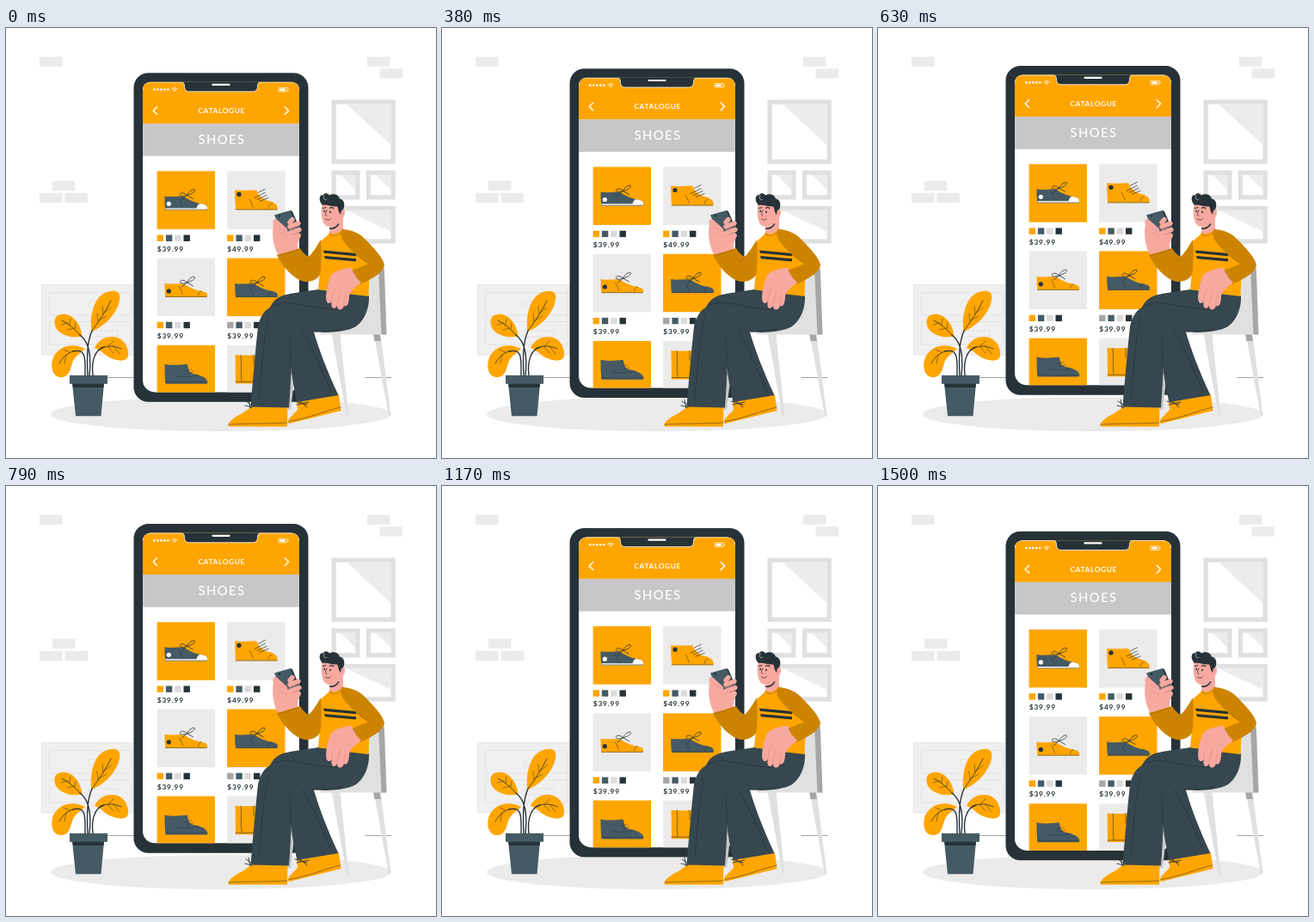
An HTML page with a canvas that plays this animation: 500 px wide and 500 px high, repeating every 1.54 s.

```html
<!DOCTYPE html>
<html lang="en">
<head>
<meta charset="utf-8">
<title>Shoe catalogue</title>
<style>
html, body { margin: 0; width: 100%; height: 100%; overflow: hidden; background: #fff; }
canvas { display: block; width: 500px; height: 500px; }
</style>
</head>
<body>
<canvas id="stage"></canvas>
<script>
const canvas = document.getElementById('stage');
const ctx = canvas.getContext('2d');
const ratio = window.devicePixelRatio || 1;
canvas.width = canvas.height = 500 * ratio;

const ORANGE = '#ffa500', AMBER = '#cc8400', INK = '#263238', SLATE = '#455a64', TROUSERS = '#37474f';
const SKIN = '#f7a9a0', BLUSH = '#e58f86', PALE = '#ebebeb', GREY = '#e0e0e0', BAND = '#c7c7c7', WHITE = '#fff';

const paths = new Map();
function path(d) {
  if (!paths.has(d)) paths.set(d, new Path2D(d));
  return paths.get(d);
}
function fill(d, color) {
  ctx.fillStyle = color;
  ctx.fill(path(d));
}
function line(d, color = INK, width = 0.7) {
  ctx.strokeStyle = color;
  ctx.lineWidth = width;
  ctx.stroke(path(d));
}
function rect(x, y, w, h, color) {
  ctx.fillStyle = color;
  ctx.fillRect(x, y, w, h);
}
function round(x, y, w, h, r, color) {
  ctx.fillStyle = color;
  ctx.beginPath();
  ctx.roundRect(x, y, w, h, r);
  ctx.fill();
}
function oval(x, y, rx, ry, color) {
  ctx.fillStyle = color;
  ctx.beginPath();
  ctx.ellipse(x, y, rx, ry, 0, 0, Math.PI * 2);
  ctx.fill();
}
function text(str, x, y, font, color, align = 'left', spacing = 0) {
  ctx.font = font + ' Lato, sans-serif';
  ctx.letterSpacing = spacing + 'px';
  ctx.textAlign = align;
  ctx.fillStyle = color;
  ctx.fillText(str, x, y);
}

function pictureFrame(x, y, w, h) {
  rect(x, y, w, h, GREY);
  rect(x + 5.3, y + 5.3, w - 10.6, h - 10.6, WHITE);
  const right = x + w - 5.3, top = y + 5.3;
  ctx.fillStyle = '#ececec';
  ctx.beginPath();
  ctx.moveTo(x + 5.3 + w * 0.17, top);
  ctx.lineTo(right, top);
  ctx.lineTo(right, top + (h - 10.6) * 0.74);
  ctx.fill();
}

function room() {
  const bricks = [[39, 33.5], [420, 33.5], [434.5, 47.3], [53.8, 177.7], [39, 191.8], [68.5, 191.8]];
  for (const [x, y] of bricks) rect(x, y, 26.5, 11.3, PALE);
  pictureFrame(378.5, 83.5, 74.3, 74.5);
  pictureFrame(378.5, 165.5, 33, 34);
  pictureFrame(419, 165.5, 33.8, 34);
  pictureFrame(378.5, 207, 74.3, 43.6);

  rect(41.5, 298.5, 112, 81.5, '#f0f0f0');
  line('M41.5 298.7H153M41.7 298.5V380H153', GREY, 0.8);
  line('M51 307.5H146V334H51ZM51 341.5H146V368H51Z', GREY, 0.8);
  line('M96.5 318H130V325H96.5ZM96.5 352H130V359H96.5Z', GREY, 0.8);

  oval(250, 449, 198, 20, PALE);
  line('M106 406.5H149M418 406.5H448', INK, 0.45);
}

function plant() {
  fill('M99.5 353C97 335 102 314 115 308C124 304 132 305 132.3 312C133 326 118 346 99.5 353Z', ORANGE);
  fill('M88.5 358C78 362 60 357 57 346C54 335 62 332 70 333C80 335 87 346 88.5 358Z', ORANGE);
  fill('M92 373C80 366 62 368 55 383C51 394 54 405 63 406C74 407 75 395 78 387C82 380 88 377 92 373Z', ORANGE);
  fill('M103 372C108 360 122 356 132 361C141 366 144 378 141 384C136 389 126 386 120 383C113 379 110 374 103 372Z', ORANGE);
  line('M95 404C94 382 94 366 100 352M97 404C99 384 98 366 86 357', INK, 1.4);
  line('M92 404C92 386 94 372 78 376M101 404C99 388 103 374 114 371', INK, 1.4);
  line('M100 352C106 344 115 331 122 317M86 357C80 350 73 344 65 340', INK, 0.8);
  line('M78 376C71 378 66 383 62 390M114 371C121 369 127 370 134 373', INK, 0.8);
  line('M107 342L106 332M113 333L112 323M108 340L117 335M114 331L122 325', INK, 0.5);
  line('M80 350L81 343M74 345L75 338M79 349L71 351M72 343L64 345', INK, 0.5);
  line('M74 377L67 374M70 380L68 390M119 370L125 364M118 370L125 378M125 370L132 379', INK, 0.5);
  fill('M77 413H114L110.5 451.3H81Z', SLATE);
  fill('M77 413H114L113.5 418H78Z', INK);
  rect(74, 403.8, 44, 10, SLATE);
}

function bow(x, y) {
  ctx.save();
  ctx.translate(x, y);
  line('M0 0C-4 -4 -9 -3 -8 0C-7 2 -3 1 0 0C2 -5 8 -8 9 -6C9 -3 4 -1 0 0L-6 5M0 0L7 4', INK, 0.8);
  ctx.restore();
}

// Origin is the bottom of the heel.
function sneaker(x, y, body, { dot, toe, high } = {}) {
  ctx.save();
  ctx.translate(x, y);
  if (high) {
    fill('M0 -23C7 -22 18 -23 25 -23C27 -17 31 -14 37 -11C47 -9 51 -5 49 0H1C0 -8 0 -16 0 -23Z', body);
    line('M23 -14L35 -20M26 -12L37 -17M29 -10L39 -14M27 -20L35 -24', INK, 0.7);
  } else {
    fill('M0 -16C7 -14 16 -17 23 -15C29 -11 37 -8 43 -7C49 -6 51 -3 49 0H1C0 -5 0 -10 0 -16Z', body);
    bow(26, -17);
  }
  if (toe) {
    fill('M37 -2C38 -6 40 -8 43 -7C49 -6 51 -3 49 0H1V-2Z', toe);
  } else {
    line('M39 -2C39 -5 41 -7 43 -7', INK, 0.5);
  }
  line('M1 -0.3H49M17 -12C19 -9 20 -6 21 -3', INK, 0.5);
  if (dot) oval(4.8, high ? -18 : -7, 2.6, 2.6, dot);
  ctx.restore();
}

function boot(x, y) {
  ctx.save();
  ctx.translate(x, y);
  fill('M0 -23C8 -21 17 -22 26 -23C28 -18 27 -14 32 -12C40 -10 51 -8 49.5 0H1C0 -8 0 -16 0 -23Z', SLATE);
  line('M1 -2.3C15 -1.5 35 -1.5 50 -2.3M24 -15L31 -17M26 -12L33 -14M14 -9C23 -7 32 -8 39 -10', INK, 0.5);
  ctx.restore();
}

function product(col, row) {
  const x = 175.6 + col * 81.5, y = 167 + row * 101.2;
  rect(x, y, 67.4, 67.5, (col + row) % 2 ? PALE : ORANGE);
  const first = col && row === 1 ? '#a6a6a6' : ORANGE;
  [first, SLATE, '#dbdbdb', INK].forEach((c, i) => rect(x + i * 10.3, y + 74.2, 7.4, 7.4, c));
  text(col && !row ? '$49.99' : '$39.99', x + 0.2, y + 93.3, 'bold 8.4px', INK, 'left', 0.8);
}

function phone(dy) {
  ctx.save();
  ctx.translate(0, dy);
  round(148.5, 53, 203, 382.6, 17, INK);
  ctx.translate(0, 0.2);
  ctx.save();
  ctx.beginPath();
  ctx.roundRect(159, 63.3, 182, 360.7, [9, 9, 14, 14]);
  ctx.clip();
  rect(159, 63, 182, 362, WHITE);
  rect(159, 63, 182, 49, ORANGE);
  rect(159, 111.8, 182, 37.7, BAND);
  fill('M204 62C207 63 207.5 66 207.5 69C208 73 210 74.5 213 74.5H287C290 74.5 292 73 292.5 69C292.5 66 293 63 296 62Z', INK);
  line('M159.3 72C159.3 66 162 63.6 168 63.6H204C207 64 207.5 66 207.5 69C208 73 210 74.5 213 74.5H287C290 74.5 292 73 292.5 69C292.5 66 293 64 296 63.6H332C338 63.6 340.7 66 340.7 72', WHITE, 0.8);

  for (let i = 0; i < 5; i++) oval(172.3 + i * 4, 72.1, 1.35, 1.35, WHITE);
  line('M192.8 71.3Q196 68.7 199.2 71.3M194.3 72.8Q196 71.5 197.7 72.8', WHITE, 0.9);
  oval(196, 74, 0.7, 0.7, WHITE);
  line('M317.5 70H327V74.6H317.5ZM328.2 71.3V73.3', WHITE, 0.7);
  rect(318.5, 71, 6.3, 2.6, WHITE);
  line('M175.6 92.4L171.2 96.8L175.6 101.2M324.2 92.4L328.6 96.8L324.2 101.2', WHITE, 1.5);
  text('CATALOGUE', 250.7, 99.6, 'bold 8.4px', WHITE, 'center', 0.6);
  text('SHOES', 251, 135.4, '500 14.8px', WHITE, 'center', 1.4);

  for (let row = 0; row < 3; row++) for (let col = 0; col < 2; col++) product(col, row);
  sneaker(184.5, 212, SLATE, { dot: WHITE, toe: WHITE });
  sneaker(266.2, 212, ORANGE, { dot: INK, high: true });
  sneaker(184.5, 313.5, ORANGE, { dot: INK });
  sneaker(266.2, 313.5, SLATE);
  boot(184.5, 414.3);
  fill('M266.5 380.5C274 381.5 285 381 292 380.5V414H267Z', ORANGE);
  line('M267 412H292M273 381C275 391 272 400 274 411M288 381V392', INK, 0.6);
  ctx.restore();
  line('M240.5 66.5H259.5', WHITE, 2.2);
  ctx.restore();
}

function chair() {
  fill('M330 400L336 402L331 444H328Z', BAND);
  fill('M378 352H388L398.5 451H396Z', GREY);
  fill('M427 352H435L447.5 451H445Z', GREY);
  fill('M427 355H434.5L436 364H428.5Z', '#a6a6a6');
  fill('M421 285L436 274C439 276 439.5 280 440 285L442.5 356.5H365L367 345L416 335Z', GREY);
  fill('M433 278L438 275C439.5 279 440 282 440 285L442.5 356.5H436.5Z', '#a6a6a6');
}

function legs() {
  fill('M338 433L387 426L389.5 445L329 460C325 456 334 450 339 444Z', ORANGE);
  line('M329 457.5C349 454.5 369 446 389 441', INK, 0.5);
  line('M336 434L350 438M338 438L352 435M340 432L350 441', INK, 0.9);
  fill('M329 350L357 350C363 372 374 400 386.5 427L338.5 435C332 408 329 380 329 350Z', TROUSERS);
  fill('M286 440L327.5 440.5L327 463.5H259C257 460 262 455 271 450C278 446.500 282 443 286 440Z', ORANGE);
  line('M259 461C282 459.5 305 460.5 327 459', INK, 0.5);
  line('M279 434L286 439M278 439L286 441M282 432L284 442', INK, 0.9);
  fill('M363 304L422 311C423 325 417 340 407 347C395 354 372 355 357 353C347 350 337 351 333 357C332 380 332 405 329 441.5L284.5 440.5C287 410 290 375 293 347C295 338 299 329 307 325C309 321 311 317 316 314C325 308 346 307 363 304Z', TROUSERS);
  line('M389 327C365 328 344 321 326 319C317 320 311 322 307 325M357 353C371 353 380 351 390 350M345 353C358 375 369 402 378 423', INK, 0.7);
  line('M306 335C299 360 297 397 294 431M330 359C331 377 331 390 331 402', INK, 0.6);
}

function head() {
  fill('M377 225L392 211L392 236C387 243 378 243 376 239Z', SKIN);
  line('M376.5 233C381 234 385 231 386.5 228', INK, 1.6);
  fill('M368 202C366 211 366 221 370 228C374 233 382 231 386 226C394 222 397 212 391 209L390 200L375 198Z', SKIN);
  fill('M368 206C363 201 364 193 369 194.5C369 192 374 191 376 194.5C381 191.5 387 194 388 198.5C393 199 395 206 392 211C390 211 390 214 389 217C386 214 387 210 385 207.5C379 208 374 205 368 206Z', INK);
  line('M370 194.5C368 198 371 202 373 199', WHITE, 0.5);
  line('M368.5 209.5L372 208.7M376.5 209.5C378 208.3 380 208.8 381 209.8', INK, 1.1);
  oval(370.2, 213, 0.9, 1.3, INK);
  oval(377, 214, 0.9, 1.3, INK);
  line('M373 212C371.5 216 370.5 218 373 218.5M371.5 222C374 224 376 223.5 377.5 221.5', INK, 0.8);
  line('M389 214C391 211 394 215 390 218', BLUSH, 0.8);
}

function body() {
  fill('M366 248C370 244 374 241 377 238C381 241 387 239 391 234C401 236 410 240 414 248L423 276L421.5 312C402 310 382 307 363 304C365 285 366 267 366 248Z', ORANGE);
  line('M376 239C381 244 388 241 392 234', AMBER, 1.2);
  fill('M369 258.500L407 262V265.200L370 261.800Z', INK);
  fill('M370 265L407 268.300V271.500L371 268.300Z', INK);

  fill('M318 266C310 255 309 239 311 228C310 223 313 220 317 223L323 230L334 231L343 241C341 248 337 250 340 261Z', SKIN);
  fill('M366 246C361 255 356 262 352 266C348 264 344 260 342 256L315 264C321 277 335 293 348 295C357 295.5 363 291 365.5 286C367 272 367 259 366 246Z', AMBER);
  line('M352 266C350 269 348 271 345 272M316 264.5C325 263 335 260 342 257', '#996300', 0.6);

  fill('M312 217.500L330 212.300Q332.500 212 333.500 214L343.500 238L326 241L314 222Z', SLATE);
  line('M331.500 213L342.500 238', INK, 1.2);
  oval(318, 218.500, 1.2, 1.2, INK);
  line('M313.500 225.500L324 235M314 232L331 242M315 238L330 247', SKIN, 6.3);
  line('M330 226L333 222.500M330 231L340 227M331 238L341 234.500M331 244.500L340 241', SKIN, 5.3);
  line('M316 231L325 236M317 237L328 243M329 235L339 231.500M331 241.500L340 238', BLUSH, 0.6);

  fill('M391 234C405 235 413 240 420 248C429 257 438 267 440 275C440 284 425 292 412 298C407 294 404 288 402 282L422 274C413 269 402 260 394 250C389 244 388 239 391 234Z', AMBER);
  line('M422 274C417 271 411 267 407 263M403 282C405 288 408 293 412 297', '#996300', 0.6);
  fill('M402 278.500C393 280 382 282 377.500 288C374 298 371 311 372.500 317C374 322 378 320 379 317C377 325 381 329 385 323C385 329 391 329 393 323C397 325 399 319 399 312C400 306 406 301 413 296C408 291 404 286 402 278.500Z', SKIN);
  line('M379 317C379 311 381 306 383 303M385 323C386 315 388 309 389 306M393 323C393 317 394 312 395 309', BLUSH, 0.7);
}

// The phone rises and sinks at a constant speed, on a 24 fps grid of 37 steps.
const STEPS = 37, LOOP = 1540, STEP = 1000 / 24;
function lift(time) {
  const step = Math.min(STEPS - 1, Math.floor((time % LOOP + 5) / STEP));
  const phase = (step + 1.5) % STEPS / STEPS;
  return -10 * (1 - Math.abs(1 - 2 * phase));
}

function draw(time) {
  ctx.setTransform(ratio, 0, 0, ratio, 0, 0);
  ctx.lineCap = ctx.lineJoin = 'round';
  rect(0, 0, 500, 500, WHITE);
  room();
  phone(lift(time));
  plant();
  chair();
  legs();
  head();
  body();
}

let start;
function tick(now) {
  start ??= now;
  draw(Math.max(0, now - start));
  requestAnimationFrame(tick);
}
draw(0);
requestAnimationFrame(tick);
</script>
</body>
</html>
```
